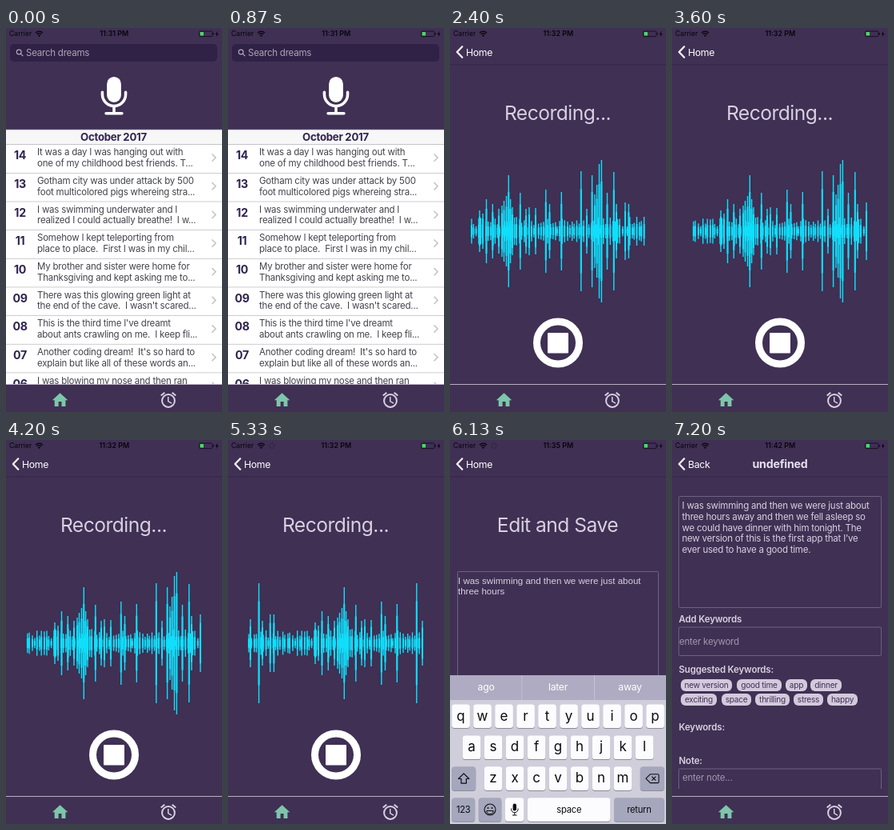
Write an HTML page that moves like this. It is 270 by 480 pixels and loops after 8.39 s.

```html
<!DOCTYPE html>
<html lang="en">
<head>
<meta charset="utf-8">
<title>Dream journal</title>
<style>
html, body { margin: 0; width: 100%; height: 100%; overflow: hidden; background: #3f3054; }
svg { display: block; width: 100%; height: 100%; }
text { font-family: Inter, Roboto, sans-serif; white-space: pre; }
.status { font-size: 8.64px; fill: #08050c; }
.clock { font-size: 8.9px; font-weight: 600; }
.nav { font-size: 12.24px; letter-spacing: -.025em; fill: #fff; }
.head { font-size: 14.2px; font-weight: 700; letter-spacing: -.015em; fill: #e6dfec; }
.title { font-size: 24.6px; letter-spacing: -.021em; fill: #d9d0e0; }
.body { font-size: 11.5px; letter-spacing: -.019em; }
.label { font-size: 11.5px; font-weight: 600; letter-spacing: -.015em; fill: #d9d0e0; }
.month { font-size: 13.2px; font-weight: 700; letter-spacing: -.02em; fill: #30234f; }
.day { font-size: 14.2px; font-weight: 700; letter-spacing: -.02em; fill: #30234f; }
.tag { font-size: 10.1px; letter-spacing: -.025em; fill: #3f3054; }
.draft { font: 11.52px "Liberation Sans", Arial, sans-serif; fill: #d9d0e0; }
.hint { font-size: 12.2px; letter-spacing: -.02em; fill: #fff; }
.key { font-size: 17px; fill: #0c0c10; }
.word { font-size: 11.2px; letter-spacing: -.02em; fill: #0c0c10; }
</style>
</head>
<body>
<svg id="stage" viewBox="0 0 270 480" preserveAspectRatio="none"></svg>
<script>
const SLIDE = 1200, LOOP = 8390;
const BG = '#3f3054', PALE = '#d9d0e0', CYAN = '#10dffb';

const text = (x, y, cls, str, more = '') =>
  `<text x="${x}" y="${y}" class="${cls}" ${more}>${str}</text>`;
const mid = (x, y, cls, str) => text(x, y, cls, str, 'text-anchor="middle"');
const rect = (x, y, w, h, fill, r = 0, more = '') =>
  `<rect x="${x}" y="${y}" width="${w}" height="${h}" rx="${r}" fill="${fill}" ${more}/>`;
const line = (d, color, w, more = '') =>
  `<path d="${d}" fill="none" stroke="${color}" stroke-width="${w}" ${more}/>`;
const box = (x, y, w, h) => rect(x, y, w, h, 'none', 1, 'stroke="#7b6f8c" stroke-width=".8"');

function status(time, busy) {
  const dark = '#08050c';
  return text(4, 10, 'status', 'Carrier') + mid(135.3, 10.2, 'status clock', time) +
    line('M37 6.1a6.3 6.3 0 0 1 9 0M38.6 7.8a4 4 0 0 1 5.8 0', dark, 1.3) +
    `<path d="M41.5 11l-1.6-1.7a2.3 2.3 0 0 1 3.2 0z" fill="${dark}"/>` +
    (busy ? `<circle cx="55" cy="7.3" r="3" fill="none" stroke="#1f172b" stroke-width="1.4" stroke-dasharray=".7 1.65"/>` : '') +
    rect(241.5, 4, 16.5, 6.6, 'none', 1.5, `stroke="${dark}" stroke-width=".7"`) +
    rect(242.6, 5, 4.4, 4.6, '#4cd964', .6) + rect(258.7, 6, 1, 2.6, dark, .5) +
    `<path d="M264.6 3.8l-2.9 4h1.8l-.8 3.2 3-4.1h-1.9z" fill="${dark}"/>`;
}

function nav(label) {
  return line('M15.3 23.3L8.8 30L15.3 36.7', '#fff', 2.2, 'stroke-linecap="round" stroke-linejoin="round"') +
    text(20, 34.5, 'nav', label) + rect(0, 45.5, 270, .7, '#30233f');
}

function tabs() {
  return rect(0, 445, 270, 35, BG) + rect(0, 445, 270, 1, '#b9b0c2') +
    `<path transform="translate(55.8 453.4) scale(.98)" fill="#7dc6aa" d="M10 20v-6h4v6h5v-8h3L12 3 2 12h3v8z"/>` +
    `<path transform="translate(191.1 453.1) scale(.99)" fill="${PALE}" d="M22 5.7l-4.6-3.9-1.3 1.6 4.6 3.8zM7.9 3.4L6.6 1.9 2 5.7l1.3 1.5zM12.5 8H11v6l4.75 2.85.75-1.23-4-2.37zM12 4a9 9 0 1 0 0 18a9 9 0 1 0 0-18zm0 16a7 7 0 1 1 0-14a7 7 0 1 1 0 14z"/>`;
}

function mic(x, y, scale) {
  return `<g transform="translate(${x} ${y}) scale(${scale})">` +
    rect(-12.5, 0, 25, 45, '#fff', 12.5) +
    line('M-20.5 27v4a20.5 20.5 0 0 0 41 0v-4M-14 64.5h28', '#fff', 5, 'stroke-linecap="round"') +
    line('M0 51v13', '#fff', 5) + '</g>';
}

const dreams = [
  ['It was a day I was hanging out with', 'one of my childhood best friends. T...'],
  ['Gotham city was under attack by 500', 'foot multicolored pigs whereing stra...'],
  ['I was swimming underwater and I', 'realized I could actually breathe!  I w...'],
  ['Somehow I kept teleporting from', 'place to place.  First I was in my chil...'],
  ['My brother and sister were home for', 'Thanksgiving and kept asking me to...'],
  ['There was this glowing green light at', "the end of the cave.  I wasn't scared..."],
  ["This is the third time I've dreamt", 'about ants crawling on me.  I keep fli...'],
  ["Another coding dream!  It's so hard to", 'explain but like all of these words an...'],
  ['I was blowing my nose and then ran', '']
];

function list() {
  const rows = dreams.map(([a, b], i) => {
    const y = 145.8 + i * 35.65, grey = 'fill="#43444c"';
    return mid(17.6, y + 18.6, 'day', String(14 - i).padStart(2, '0')) +
      text(39, y + 13.5, 'body', a, grey) + text(39, y + 27.2, 'body', b, grey) +
      line(`M257.5 ${y + 11.7}l4.6 4.6l-4.6 4.6`, '#c3c3c9', 1.5) +
      rect(0, y + 35.2, 270, .7, '#b8b8be');
  }).join('');
  return status('11:31 PM') + rect(5, 20, 259, 22, '#302246', 5) +
    '<circle cx="16.2" cy="30" r="2.9" fill="none" stroke="#b4abbd" stroke-width="1.1"/>' +
    line('M18.3 32.2l3 3', '#b4abbd', 1.2) +
    text(25, 35, 'body', 'Search dreams', 'fill="#aea4b7"') + mic(135, 61, .71) +
    rect(0, 127, 270, 318, '#fff') + rect(0, 127, 270, 18.6, '#f7f7f8') +
    rect(0, 126.8, 270, .8, '#b8b8be') + rect(0, 145.2, 270, .8, '#b8b8be') +
    mid(134.5, 141, 'month', 'October 2017') + rows + tabs();
}

const record = () => status('11:32 PM') + nav('Home') +
  mid(134.5, 115, 'title', 'Record Your Dream') + mic(135, 358, 1) + tabs();

// Tall bars as position, half height; short ones are seeded.
const peaks = [-44,30, -33.4,75, -29,28, -19.3,36, -14.6,36, 37,26, 41,22, 45.5,40, 53.3,34,
  61,28, 65,32, 67.5,38, 70.5,44, 73.3,70, 75.6,40, 78,30, 87.8,48, 95,28, 99,30, 107,29,
  119.8,52, 124.5,34, 139.3,49, 163.8,75, 171,28, 177.6,70, 181,46, 183.6,58, 186.5,84,
  189.4,89, 196.5,48, 204.8,74, 208,34, 219,36, 223.4,34];

function wave(shift) {
  let seed = 11, thin = '', thick = '';
  const rand = () => (seed = seed * 16807 % 2147483647) / 2147483647;
  const bar = (x, h) => {
    x += shift;
    return x < 26 || x > 244 ? '' : `M${x.toFixed(1)} ${(254 - h).toFixed(1)}V${(254 + h).toFixed(1)}`;
  };
  for (let x = -46; x < 245; x += 3) {
    const at = x + rand(), h = 6 + 12 * rand();
    thin += bar(at, h);
    thick += bar(at, h * .5);
  }
  for (let i = 0; i < peaks.length; i += 2) {
    thin += bar(peaks[i], peaks[i + 1]);
    thick += bar(peaks[i], peaks[i + 1] * .7);
  }
  return line(thin, CYAN, 1.4) + line(thick, CYAN, 2.1);
}

const recording = (shift, busy) => status('11:32 PM', busy) + nav('Home') +
  mid(134.5, 115, 'title', 'Recording...') + wave(shift) +
  '<circle cx="135" cy="393.5" r="26.5" fill="none" stroke="#fff" stroke-width="9"/>' +
  rect(122, 381, 26, 25.5, '#fff', 1) + tabs();

function key(x, y, w, label, grey, cls = 'key') {
  return rect(x, y + 1, w, 29.6, '#8b8a9c', 3.6) + rect(x, y, w, 29.6, grey ? '#a5a7bd' : '#fcfcfe', 3.6) +
    mid(x + w / 2, y + (cls === 'key' ? 20 : 18.8), cls, label);
}

function keyboard() {
  const rows = [['qwertyuiop', 2.2], ['asdfghjkl', 15.7], ['zxcvbnm', 42.7]];
  const top = i => 330.5 + 38.9 * i, ink = '#0c0c10';
  const letters = rows.map(([keys, x], r) =>
    [...keys].map((k, i) => key(x + 27 * i, top(r), 22.7, k)).join('')).join('');
  const hints = ['ago', 'later', 'away'].map((w, i) => mid(45 + 90 * i, 313, 'hint', w)).join('');
  return rect(0, 294, 270, 186, '#cfceda') + rect(0, 294, 270, 31, '#aeabc2') +
    rect(89.5, 294, .8, 31, '#cbc8d8') + rect(180, 294, .8, 31, '#cbc8d8') + hints + letters +
    key(2.2, top(2), 30, '', 1) + key(237.8, top(2), 30, '', 1) +
    key(2.2, top(3), 29, '123', 1, 'word') + key(35.8, top(3), 28.5, '', 1) +
    key(69, top(3), 23.5, '') + key(97, top(3), 103.5, 'space', 0, 'word') +
    key(205, top(3), 62.8, 'return', 1, 'word') +
    line('M17.2 416.8l-6.6 6.7h3.4v5.6h6.4v-5.6h3.4z', ink, 1.2, 'stroke-linejoin="round"') +
    line('M250.3 417.8h9.5q1.2 0 1.2 1.2v8.4q0 1.2-1.2 1.2h-9.5l-5.4-5.4zM252.3 420.7l5 5m0-5l-5 5', ink, 1.1, 'stroke-linejoin="round"') +
    '<circle cx="50" cy="462" r="7" fill="none" stroke="#0c0c10" stroke-width="1.1"/>' +
    '<circle cx="47.5" cy="460" r="1" fill="#0c0c10"/><circle cx="52.5" cy="460" r="1" fill="#0c0c10"/>' +
    line('M45.8 463.5h8.4a4.2 4 0 0 1-8.4 0z', ink, 1) +
    rect(78.6, 454.5, 4.4, 9, ink, 2.2) +
    line('M76.6 460.5v1a4.2 4.2 0 0 0 8.4 0v-1M80.8 465.7v3.3M78 469h5.6', ink, 1);
}

const edit = () => status('11:35 PM', true) + nav('Home') +
  mid(134.5, 115, 'title', 'Edit and Save') + box(9.5, 164.5, 251, 140) +
  text(10, 179.5, 'draft', 'I was swimming and then we were just about') +
  text(10, 193, 'draft', 'three hours') + keyboard();

const story = ['I was swimming and then we were just about', 'three hours away and then we fell asleep so',
  'we could have dinner with him tonight. The', 'new version of this is the first app that I’ve',
  'ever used to have a good time.'];

const tags = [
  ['new version', 11, 299, 64], ['good time', 81, 299, 56], ['app', 142, 299, 27], ['dinner', 173, 299, 39],
  ['exciting', 11, 317, 45], ['space', 62, 317, 37], ['thrilling', 104, 317, 43], ['stress', 152, 317, 37],
  ['happy', 194, 317, 38]
];

function details() {
  const dim = 'fill="#a297ad"';
  return status('11:42 PM') + nav('Back') + mid(135, 35, 'head', 'undefined') + box(8.5, 70.5, 253, 139) +
    story.map((s, i) => text(12.5, 86 + 13.75 * i, 'body', s, `fill="${PALE}"`)).join('') +
    text(8.5, 228, 'label', 'Add Keywords') + box(8.5, 234, 253, 35.5) +
    text(9, 255.8, 'body', 'enter keyword', dim) + text(8.5, 291.2, 'label', 'Suggested Keywords:') +
    tags.map(([s, x, y, w]) => rect(x, y, w, 15, '#d3c9dc', 6) + mid(x + w / 2, y + 11.2, 'tag', s)).join('') +
    text(8.5, 363, 'label', 'Keywords:') + text(8.5, 405, 'label', 'Note:') +
    box(8.5, 411, 253, 40) + text(13, 426.2, 'body', 'enter note...', dim) + rect(0, 436, 270, 9, BG) + tabs();
}

const slides = [list(), record(), recording(0), recording(24), recording(72, true), edit(), details()];
const stage = document.getElementById('stage');
stage.innerHTML = rect(0, 0, 270, 480, BG) + slides.map(s => `<g display="none">${s}</g>`).join('');
const groups = [...stage.children].slice(1);

function draw(t) {
  const now = Math.min(slides.length - 1, Math.floor(t / SLIDE));
  groups.forEach((g, i) => g.setAttribute('display', i === now ? 'inline' : 'none'));
}

const start = performance.now();
function tick() {
  draw((performance.now() - start) % LOOP);
  requestAnimationFrame(tick);
}
tick();
</script>
</body>
</html>
```
